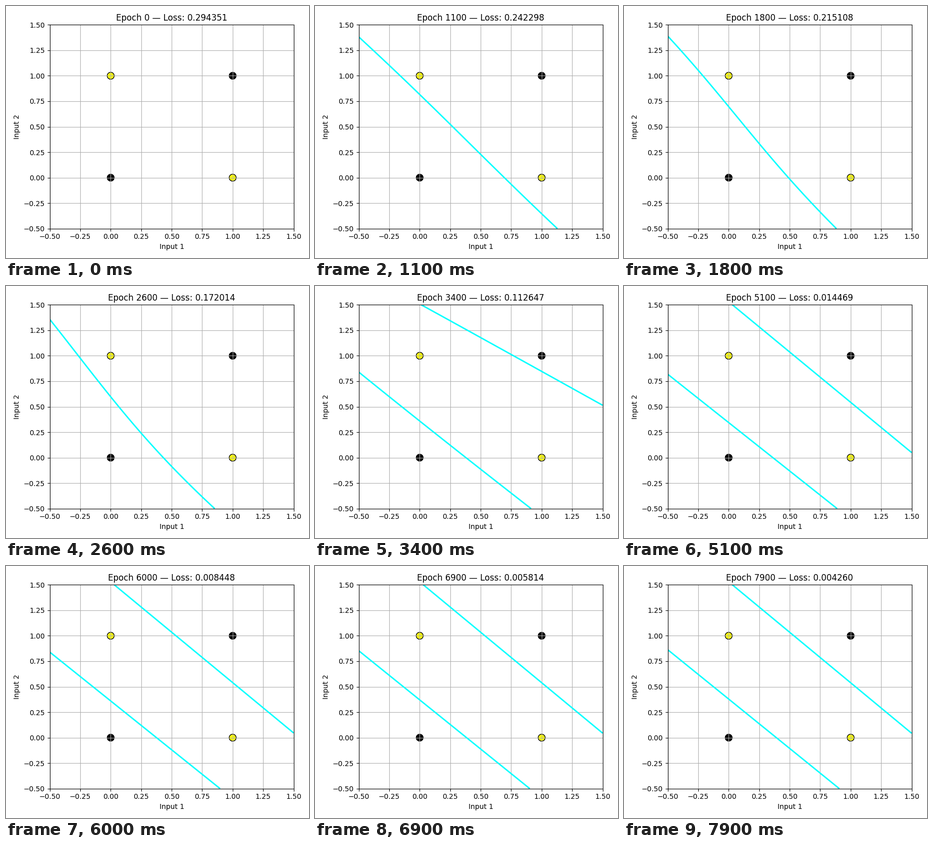
A matplotlib script that plays this animation: 600 by 500 pixels, repeating every 8 s.

```python
import numpy as np
import matplotlib.pyplot as plt
from matplotlib.animation import FuncAnimation

FRAMES, STEP, RATE = 80, 100, 0.1

X = np.array([[0, 0], [0, 1], [1, 0], [1, 1]], float)
y = np.array([[0], [1], [1], [0]], float)


def sigmoid(z):
    return 1 / (1 + np.exp(-z))


def forward(x, w1, b1, w2, b2):
    hidden = sigmoid(x @ w1 + b1)
    return hidden, sigmoid(hidden @ w2 + b2)


def train():
    """Train a 2-2-1 network on XOR; keep the weights and loss every STEP epochs."""
    rng = np.random.RandomState(42)
    w1, b1 = rng.randn(2, 2), rng.randn(1, 2)
    w2, b2 = rng.randn(2, 1), rng.randn(1, 1)
    history = []
    for epoch in range(FRAMES * STEP):
        hidden, out = forward(X, w1, b1, w2, b2)
        error = y - out
        if epoch % STEP == 0:
            history.append(((w1, b1, w2, b2), np.mean(error ** 2)))
        d_out = error * out * (1 - out)
        d_hidden = d_out @ w2.T * hidden * (1 - hidden)
        w2 = w2 + RATE * hidden.T @ d_out
        b2 = b2 + RATE * d_out.sum(axis=0, keepdims=True)
        w1 = w1 + RATE * X.T @ d_hidden
        b1 = b1 + RATE * d_hidden.sum(axis=0, keepdims=True)
    return history


history = train()
xx, yy = np.meshgrid(np.linspace(-0.5, 1.5, 200), np.linspace(-0.5, 1.5, 200))
grid = np.c_[xx.ravel(), yy.ravel()]

fig, ax = plt.subplots(figsize=(6, 5), dpi=100)
colors = ["yellow" if t else "black" for t in y.ravel()]
ax.scatter(X[:, 0], X[:, 1], c=colors, s=100, edgecolors="k")
ax.set(xlim=(-0.5, 1.5), ylim=(-0.5, 1.5), xlabel="Input 1", ylabel="Input 2")
ax.grid(True)
title = ax.set_title("Epoch 0 — Loss: 0.000000")
fig.tight_layout()

boundary = []


def update(i):
    while boundary:
        boundary.pop().remove()
    weights, loss = history[i]
    title.set_text(f"Epoch {i * STEP} — Loss: {loss:.6f}")
    zz = forward(grid, *weights)[1].reshape(xx.shape)
    if zz.min() < 0.5 < zz.max():
        boundary.append(ax.contour(xx, yy, zz, levels=[0.5], colors="cyan", linewidths=2))


anim = FuncAnimation(fig, update, frames=FRAMES, interval=100,
                     init_func=lambda: None, repeat=True, repeat_delay=0)
plt.show()
```
